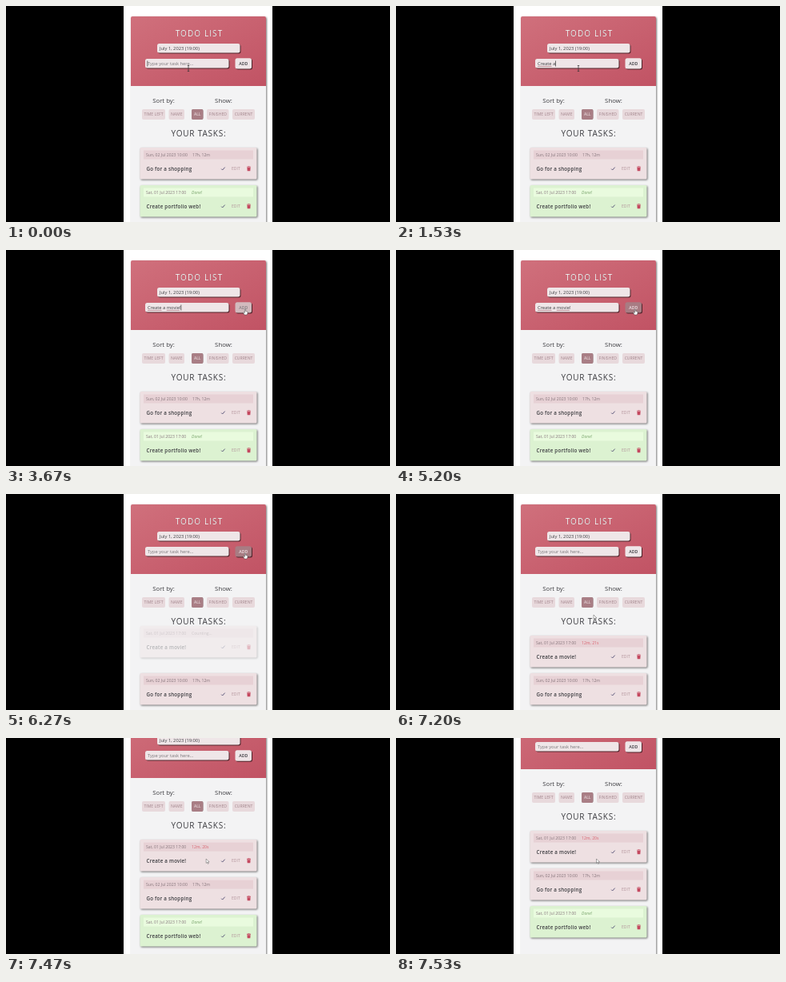
Write an HTML page that moves like this. It is 480x270 px and loops after 7.59 s.

```html
<!DOCTYPE html>
<html lang="en">
<head>
<meta charset="utf-8">
<title>Todo list</title>
<style>
  html, body { margin: 0; width: 100%; height: 100%; overflow: hidden; background: #000; }
  svg { display: block; width: 480px; height: 270px; }
  text { font-family: "Open Sans", "Noto Sans", sans-serif; white-space: pre; fill: #3c3c40; }
  .mid { text-anchor: middle; }
  .title { font-size: 10px; letter-spacing: 1.1px; fill: #fff; filter: drop-shadow(.7px .8px .5px #0009); }
  .heading { font-size: 10px; letter-spacing: .8px; }
  .label { font-size: 7.8px; }
  .field { font-size: 5.75px; }
  .box { fill: #efe6e8; filter: drop-shadow(1.2px 1.2px .7px #0009); }
  .add { font-size: 5.2px; font-weight: 600; }
  .filter { font-size: 5.1px; fill: #a1848b; }
  .pill { fill: #e8d9dc; }
  .on.pill { fill: #a97e85; filter: drop-shadow(.4px .5px .4px #0005); }
  .on.filter { fill: #f6ecee; }
  .card { fill: #eee0e2; filter: drop-shadow(1.3px 1.3px .8px #0008); }
  .bar { fill: #e7d1d5; }
  .done .card { fill: #dcf2d1; }
  .done .bar { fill: #e9fbde; }
  .meta { font-size: 5.1px; fill: #85757b; }
  .urgent { fill: #d9636f; }
  .done .left { fill: #76a268; font-style: italic; }
  .task { font-size: 6.2px; font-weight: 600; letter-spacing: .23px; }
  .edit { font-size: 5.1px; fill: #b3949b; }
  .tick { fill: none; stroke: #4d4a70; stroke-width: .9; }
  .bin { fill: #c4485f; }
  .squiggle { stroke: #a3666e; stroke-width: .6; }
</style>
</head>
<body>
<svg viewBox="0 0 480 270">
  <defs>
    <linearGradient id="rose" x1="0" y1="0" x2="1" y2="1">
      <stop offset="0" stop-color="#d0707c"/>
      <stop offset="1" stop-color="#c15364"/>
    </linearGradient>
  </defs>
  <rect width="480" height="270"/>
  <rect x="147" width="186" height="270" fill="#fff"/>
  <g id="page">
    <rect x="156" y="13" width="169" height="420" rx="2" fill="#f3f3f4" style="filter:drop-shadow(1.5px 1px 1px #0008)"/>
    <path d="M156 100V15q0-2 2-2H323q2 0 2 2V100Z" fill="url(#rose)"/>
    <text class="title mid" x="241.5" y="38">TODO LIST</text>
    <rect class="box" x="189" y="47" width="103.5" height="11.5" rx="2.5"/>
    <text class="field" x="192" y="55">July 1, 2023 (19:00)</text>
    <rect class="box" x="174" y="66" width="104.5" height="11.5" rx="2.5"/>
    <text class="field" id="hint" x="177" y="74" fill-opacity=".65">Type your task here...</text>
    <text class="field" id="typed" x="177" y="74"></text>
    <line class="squiggle" id="mark1" y1="75.4" y2="75.4"/>
    <line class="squiggle" id="mark2" y1="75.4" y2="75.4"/>
    <rect id="caret" y="68.5" width=".7" height="7" fill="#333"/>
    <rect class="box" id="addBox" x="286.5" y="65.3" width="20.5" height="13.3" rx="2.5"/>
    <text class="add mid" id="addText" x="296.8" y="74">ADD</text>
    <text class="label mid" x="197" y="120.5">Sort by:</text>
    <text class="label mid" x="272" y="120.5">Show:</text>
    <g id="filters"></g>
    <text class="heading mid" x="241" y="163">YOUR TASKS:</text>
    <g id="cards"></g>
  </g>
  <g id="mouse">
    <path id="beam" d="M-1.2-3.5H1.2M0-3.5V3.5M-1.2 3.5H1.2" fill="none" stroke="#333" stroke-width=".7"/>
    <path id="arrow" d="M0 0V5.4L1.3 4.3 2.2 6.3 3.1 5.9 2.2 4H4Z" fill="#fff" stroke="#555" stroke-width=".5"/>
    <path id="hand" d="M-.6-.4Q0-1 .6-.4V2L3 2.6V4.6L2.2 6.5H-1L-2.4 3.8-1.8 3.2-.6 4Z" fill="#fff" stroke="#444" stroke-width=".5"/>
  </g>
</svg>
<script>
const LOOP = 7590, FRAME = 200 / 3;
const $ = id => document.getElementById(id);
const show = (el, on) => el.setAttribute('visibility', on ? 'visible' : 'hidden');
const move = (el, x, y) => el.setAttribute('transform', `translate(${x} ${y})`);

const filters = [['TIME LEFT', 170, 29], ['NAME', 203.5, 19.5], ['ALL', 232, 14.5], ['FINISHED', 251, 27.5], ['CURRENT', 283, 28]];
$('filters').innerHTML = filters.map(([name, x, w]) => {
  const on = name === 'ALL' ? 'on ' : '';
  return `<rect class="${on}pill" x="${x}" y="129" width="${w}" height="13" rx="2"/>
    <text class="${on}filter mid" x="${x + w / 2}" y="137.4">${name}</text>`;
}).join('');

const card = (id, kind, date, leftX, left, task) => `<g id="${id}" class="${kind}">
  <rect class="card" x="167.5" y="177" width="146" height="39.5" rx="1.5"/>
  <rect class="bar" x="172" y="180.5" width="137" height="11"/>
  <text class="meta" x="175" y="188">${date}</text>
  <text class="meta left" x="${leftX}" y="188">${left}</text>
  <text class="task" x="175.5" y="205.6">${task}</text>
  <path class="tick" d="M269.2 203.6L270.6 205 273.6 201.6"/>
  <text class="edit" x="282" y="205.2">EDIT</text>
  <path class="bin" d="M301 200.8H302.6V200.2H304.4V200.8H306V201.6H301ZM301.4 202.1H305.6L305.3 206.2H301.7Z"/>
</g>`;
$('cards').innerHTML =
  card('movie', '', 'Sat, 01 Jul 2023 17:00', 232, '', 'Create a movie!') +
  card('shop', '', 'Sun, 02 Jul 2023 10:00', 233, '17h, 12m', 'Go for a shopping') +
  card('web', 'done', 'Sat, 01 Jul 2023 17:00', 232, 'Done!', 'Create portfolio web!');
const countdown = $('movie').querySelector('.left');

// [time, length of the typed text]
const TEXT = 'Create a movie!';
const keys = [[400, 1], [600, 2], [800, 3], [1000, 4], [1130, 5], [1200, 6], [1470, 7], [1530, 8],
  [1730, 9], [1930, 10], [2000, 11], [2130, 13], [2200, 14], [2530, 15]];
const ADDED = 6065;

const scroll = [[7200, 0], [7267, -6], [7333, -20], [7400, -37], [7467, -50], [7533, -61]];
const mouseX = [[3267, 228], [3535, 299], [6870, 299], [7135, 247], [7200, 247], [7333, 249.5], [7533, 250.5]];
const mouseY = [[3267, 78], [3535, 74.5], [6870, 74.5], [7135, 151], [7533, 151]];
const hover = [[3530, 0], [3860, 1], [6930, 1], [7190, 0]];
const enter = [[6065, 0], [6670, 1]];

function at(stops, t) {
  if (t <= stops[0][0]) return stops[0][1];
  for (let i = 1; i < stops.length; i++) {
    const [t0, a] = stops[i - 1], [t1, b] = stops[i];
    if (t <= t1) return a + (b - a) * (t - t0) / (t1 - t0);
  }
  return stops[stops.length - 1][1];
}

const mix = (a, b, p) => `rgb(${a.map((v, i) => Math.round(v + (b[i] - v) * p))})`;

function underline(line, from, to, on) {
  show(line, on);
  if (!on) return;
  const start = from ? $('typed').getSubStringLength(0, from) : 0;
  line.setAttribute('x1', 177 + start);
  line.setAttribute('x2', 177 + $('typed').getSubStringLength(0, to));
}

function drawInput(t) {
  const last = keys.filter(k => k[0] <= t + 5).pop();
  const n = last && t < ADDED ? last[1] : 0;
  const typed = $('typed');
  typed.textContent = TEXT.slice(0, n);
  show($('hint'), !n);
  underline($('mark1'), 0, 6, n > 6);
  underline($('mark2'), 9, 14, n > 14 && t > 3262);
  $('caret').setAttribute('x', 177 + (n ? typed.getComputedTextLength() : -.5));
  const lit = last ? (t - last[0] + 5) % 1067 < 533 : t < 130;
  show($('caret'), lit && t < ADDED);
}

function drawMouse(t) {
  const x = at(mouseX, t), y = at(mouseY, t);
  const beam = t < 5000 && x < 279;
  const hand = x > 286 && y < 79;
  move($('mouse'), x, y);
  show($('beam'), beam);
  show($('hand'), hand);
  show($('arrow'), !beam && !hand);
}

function drawCards(t) {
  const added = t >= ADDED, p = at(enter, t);
  show($('movie'), added);
  $('movie').setAttribute('opacity', p);
  move($('movie'), 0, -18 * (1 - p));
  move($('shop'), 0, added ? 47 : 0);
  move($('web'), 0, added ? 94 : 47);
  const counting = t < 6660;
  countdown.textContent = counting ? 'Counting...' : t < 7460 ? '12m, 21s' : '12m, 20s';
  countdown.classList.toggle('urgent', !counting);
}

function draw(now) {
  const t = Math.floor((now % LOOP + 5) / FRAME) * FRAME;
  const h = at(hover, t);
  move($('page'), 0, at(scroll, t));
  $('addBox').style.fill = mix([239, 230, 232], [168, 124, 131], h);
  $('addText').style.fill = mix([55, 55, 60], [240, 226, 229], h);
  drawInput(t);
  drawCards(t);
  drawMouse(t);
}

const start = performance.now();
function tick() {
  draw(performance.now() - start);
  requestAnimationFrame(tick);
}
tick();
</script>
</body>
</html>
```
